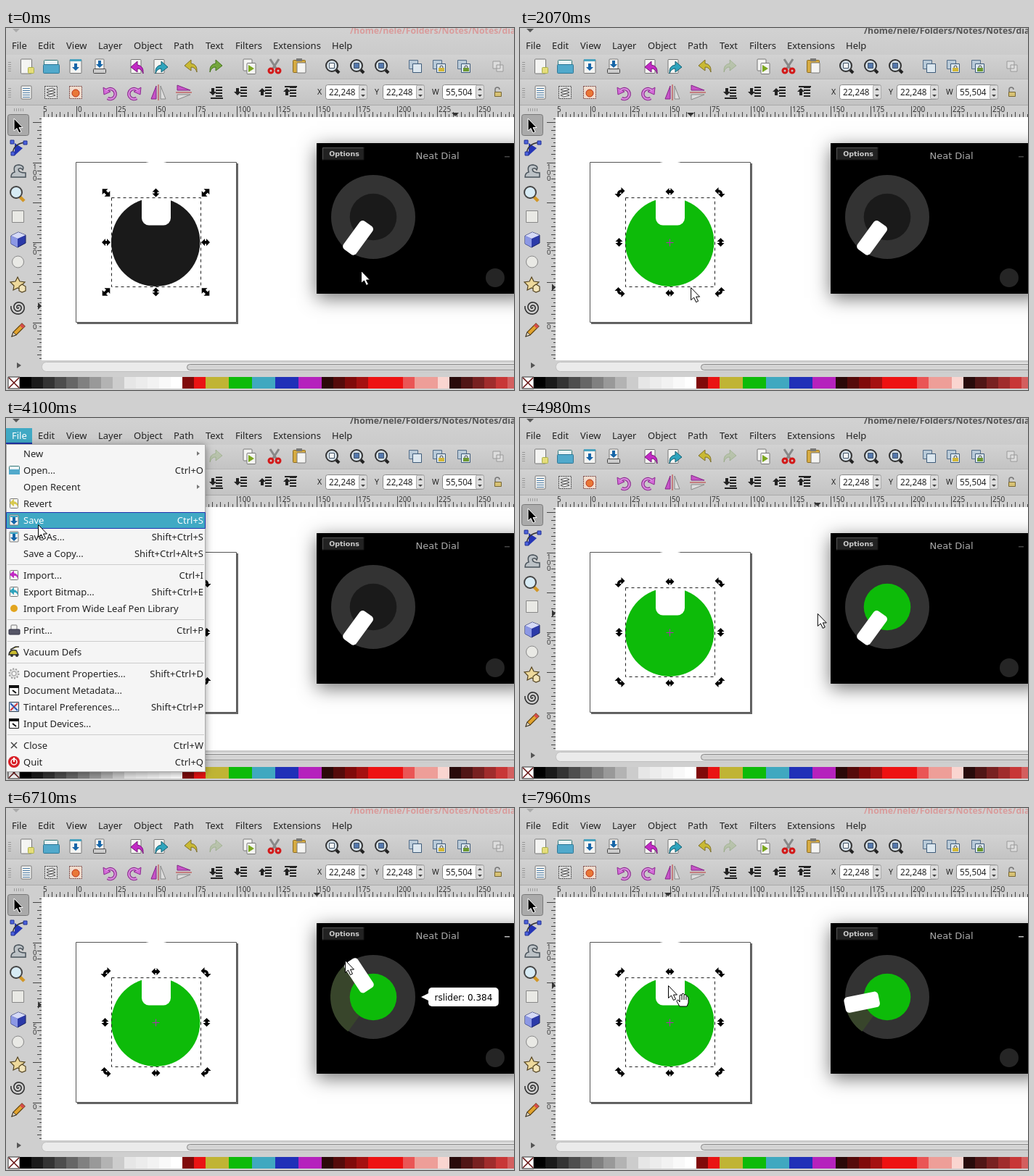
Write an HTML page with a canvas that moves like this. It is 700 by 500 pixels and loops after 8000 ms.

```html
<!DOCTYPE html>
<html lang="en">
<head>
<meta charset="utf-8">
<title>Knob editing</title>
<style>
  html, body { margin: 0; width: 100%; height: 100%; overflow: hidden; background: #cdcdcd; }
  canvas { display: block; width: 700px; height: 500px; }
</style>
</head>
<body>
<canvas id="stage" width="700" height="500"></canvas>
<script>
const ctx = document.getElementById('stage').getContext('2d');
const LOOP = 8000, UI = '"Noto Sans", sans-serif', WIDGET = '"DejaVu Sans", sans-serif';
const GREEN = '#0dbb09', BLUE = '#40a9c4', PANEL = '#cfcfcf';

// Timed moves: [ms, ...values]
const cursorKeys = [
  [0, 489, 335], [40, 489, 335], [180, 478, 312], [500, 380, 293], [800, 212, 306], [1290, 212, 306],
  [1600, 308, 476], [1740, 318, 484], [1900, 318, 484], [2300, 84, 130], [2470, 62, 98], [2550, 62, 98],
  [2960, 19, 18], [3200, 19, 18], [3560, 42, 148], [3770, 42, 148], [3810, 44, 147], [4400, 44, 147],
  [5020, 428, 272], [5210, 485, 274], [5300, 485, 274], [5940, 463, 222], [6060, 463, 222],
  [6380, 470, 110], [6710, 467, 210], [6880, 467, 210], [7180, 462, 262], [7300, 462, 262],
  [7460, 428, 262], [7960, 204, 245]
];
const valueKeys = [[5300, 0], [5940, .28], [6060, .28], [6380, .88], [6710, .384], [6880, .384], [7180, .147]];

// Smooth interpolation that rests at holds and never overshoots
function track(keys, t, c) {
  const n = keys.length - 1;
  if (t <= keys[0][0]) return keys[0][c];
  if (t >= keys[n][0]) return keys[n][c];
  const i = keys.findIndex(k => k[0] > t) - 1;
  const slope = j => (keys[j + 1][c] - keys[j][c]) / (keys[j + 1][0] - keys[j][0]);
  const tangent = j => {
    if (j < 1 || j >= n) return 0;
    const a = slope(j - 1), b = slope(j);
    return a * b <= 0 ? 0 : 2 * a * b / (a + b);
  };
  const [a, b] = [keys[i], keys[i + 1]], d = b[0] - a[0], u = (t - a[0]) / d, v = 1 - u;
  return v * v * (1 + 2 * u) * a[c] + u * u * (3 - 2 * u) * b[c]
    + d * u * v * (v * tangent(i) - u * tangent(i + 1));
}
const cursorAt = t => [track(cursorKeys, t, 1), track(cursorKeys, t, 2)];

// Drawing helpers
function paint(path, fill, stroke, width = 1) {
  if (fill) { ctx.fillStyle = fill; ctx.fill(path); }
  if (stroke) { ctx.strokeStyle = stroke; ctx.lineWidth = width; ctx.stroke(path); }
}
function shape(d, x, y, fill, stroke, width, turn = 0, flip = 1) {
  ctx.save();
  ctx.translate(x, y);
  ctx.rotate(turn * Math.PI / 180);
  ctx.scale(flip, 1);
  paint(new Path2D(d), fill, stroke, width);
  ctx.restore();
}
function box(x, y, w, h, fill, stroke, r = 0) {
  const p = new Path2D();
  p.roundRect(x, y, w, h, r);
  paint(p, fill, stroke);
}
function disc(x, y, r, fill, stroke, width) {
  const p = new Path2D();
  p.arc(x, y, r, 0, 7);
  paint(p, fill, stroke, width);
}
function text(s, x, y, size = 13, color = '#222', align = 'left', font = UI, weight = '') {
  ctx.font = `${weight} ${size}px ${font}`;
  ctx.fillStyle = color;
  ctx.textAlign = align;
  ctx.fillText(s, x, y);
}
function shade(y, h, from, to) {
  const g = ctx.createLinearGradient(0, y, 0, y + h);
  g.addColorStop(0, from);
  g.addColorStop(1, to);
  box(0, y, 700, h, g);
}
function dashed(pattern, drawDashed) {
  ctx.setLineDash(pattern);
  drawDashed();
  ctx.setLineDash([]);
}
function shadowed(color, blur, offset, drawShadowed) {
  ctx.save();
  ctx.shadowColor = color; ctx.shadowBlur = blur; ctx.shadowOffsetY = offset;
  drawShadowed();
  ctx.restore();
}

const CURVE = 'M8 8Q9 -3 0 -4V-9L-9 -1L0 6V1Q6 1 8 8Z';
const DOWN = 'M-2 -5H2V0H5L0 5L-5 0H-2Z';
const DOUBLE = 'M-6 0L-1 -5V-2H1V-5L6 0L1 5V2H-1V5Z';
const STAR = 'M0 -9L3 -3L10 -2L5 3L6 9L0 6L-6 9L-5 3L-10 -2L-3 -3Z';
const ARROW = 'M0 0V17L4 13.5L7 20L10 18.5L7 12.5H12Z';

function page(x, y, w = 16, h = 20) { box(x - w / 2 + .5, y - h / 2 + .5, w - 1, h - 1, '#f4f4f2', '#777', 1); }
function grip(x, y, dx, dy) { for (let i = -2; i < 3; i++) box(x + i * dx, y + i * dy, dx ? 1 : 4, dy ? 1 : 4, '#999'); }

function fileIcons(redoReady) {
  page(28, 53, 16, 21); box(30.5, 54.5, 8, 8, '#e6dd7a', '#a8b04a', 1);
  box(52.5, 44.5, 19, 17, '#e9f3f7', '#377', 1); box(51.5, 50.5, 22, 12, '#51a9cb', '#2d7695', 1);
  page(96, 53, 17); box(88, 43, 16, 3, '#49a3bf'); shape(DOWN, 96, 54, '#1565a8');
  page(129, 51, 13, 17); shape(DOWN, 129, 50, '#1565a8'); box(120.5, 56.5, 17, 6, '#ccc', '#444', 1);
  page(179, 53, 15); shape(CURVE, 181, 55, '#c22ac4', '#78147a');
  page(211, 53, 15); shape(CURVE, 214, 55, '#2fa4bd', '#146073', 1, 0, -1);
  shape(CURVE, 255, 53, '#c9b934', '#7e702a');
  ctx.globalAlpha = redoReady ? 1 : .22;
  shape(CURVE, 289, 53, '#74a63c', '#47741f', 1, 0, -1);
  ctx.globalAlpha = 1;
  page(333, 51, 13, 17); page(338, 56, 13, 16); shape('M-4 -5L4 0L-4 5Z', 338, 56, '#7ca81f');
  shape('M-6 -9L3 5M6 -9L-3 5', 370, 52, null, '#888', 3);
  disc(365, 59, 3, null, '#d31818', 3); disc(375, 59, 3, null, '#d31818', 3);
  box(395.5, 44.5, 17, 17, '#d6ab42', '#8a6b22', 1); box(400, 42, 8, 4, '#777'); page(407, 55, 13, 15);
  for (const x of [450, 484, 518]) {
    shape('M5 6L9 10', x, 52, null, '#222', 4);
    disc(x - 1, 52, 8, '#d5e0e8', '#333', 2);
    box(x - 4.5, 48.5, 7, 7, x > 460 ? '#5478ad' : '#f4f4f4', '#456');
  }
  for (const x of [564, 597, 631]) {
    box(x - 8.5, 44.5, 12, 12, '#b9cad8', '#536d88');
    box(x - 3.5, 49.5, 12, 12, '#dce7ef', '#3d5a79');
    if (x > 570) { disc(x + 3, 54, 2, null, '#444'); box(x - 1, 55, 8, 5, x < 610 ? '#d2b636' : '#6d9932'); }
  }
  shape('M-7 -7H3V3H-7ZM-2 -2H7V7H-2Z', 678, 53, '#ddd', '#999');
}

function editIcons() {
  page(28, 89, 15, 19); for (let y = 83; y < 97; y += 3) box(23, y, 10, 1, '#4a7aa5');
  dashed([2, 1], () => {
    box(53.5, 80.5, 17, 17, '#ddd', '#444');
    box(87.5, 80.5, 17, 17, '#f0dccd', '#744');
  });
  for (let y = 85; y < 95; y += 4) shape('M-6 0L2 -2L6 0L-2 2Z', 62, y, '#fff', '#555');
  disc(96, 90, 5, '#e97837', '#bd2f17');
  for (const [x, flip] of [[143, 1], [177, -1]]) {
    const loop = 'M-5 -3A7 7 0 1 1 -3 7';
    shape(loop, x, 90, null, '#8c2a90', 4.5, 0, flip);
    shape('M-9 -8L-8 2L1 -2Z', x, 90, '#d46ad8', '#8c2a90', 1, 0, flip);
    shape(loop, x, 90, null, '#d98add', 2.2, 0, flip);
  }
  for (const [x, turn] of [[210, 0], [245, 90]]) {
    shape('M-3 -9V9H-10Z', x, 89, '#c653c8', '#852488', 1, turn);
    shape('M3 -9V9H10Z', x, 89, '#ddd', '#888', 1, turn);
    shape('M0 -11V11', x, 89, null, '#b33', 1, turn);
  }
  [290, 324, 358, 392].forEach((x, i) => {
    for (let k = 0; k < 4; k++) box(x - 1, 81 + k * 4, 9, 2, '#222');
    shape(DOWN, x - 5, 88, '#222', null, 1, i > 1 ? 180 : 0);
    if (i % 3 === 0) box(x - 8, i ? 80 : 96, 17, 2, '#222');
  });
  for (const [label, left, value] of [['X', 441, '22,248'], ['Y', 520, '22,248'], ['W', 602, '55,504']]) {
    text(label, left - (label === 'W' ? 15 : 12), 92, 10.5);
    box(left - .5, 78.5, 57, 20, '#fff', '#888', 3);
    box(left + 45.5, 79, 11, 19, '#ddd', '#aaa', 2);
    text(value, left + 4, 93, 11.7);
    shape('M-3 -3L0 -6L3 -3ZM-3 3L0 6L3 3Z', left + 51, 89, '#444');
  }
  shape('M-3 0V-3A3 3 0 0 1 3 -3', 677, 88, null, '#777', 1.5);
  box(673.5, 88.5, 9, 6, '#d7c174', '#776734');
}

function toolIcons() {
  box(2.5, 119.5, 29, 29, '#aaa', '#777', 3);
  shape(ARROW, 11, 125, '#000', '#fff');
  shape('M-5 -7V10L6 0Z', 17, 166, '#2536b7');
  shape('M-9 8Q-8 -6 8 -8', 18, 166, null, '#333', 1.5);
  for (const [x, y] of [[8, 157], [26, 158], [9, 173]]) box(x - 2, y - 2, 5, 5, '#4d63dd', '#203094');
  shape('M-10 9Q-10 3 -5 2Q-8 -8 1 -8Q9 -7 6 -1Q3 -5 0 -2Q0 3 10 3V9Z', 17, 197, '#bcc2c6', '#4a545c', 1.5);
  shape('M5 5L11 11', 14, 228, null, '#d29725', 4.5);
  disc(14, 227, 8, '#d7ebf4', '#444', 2);
  box(8.5, 252.5, 16, 16, '#e9e9e5', '#888');
  shape('M-10 -5L0 -10L10 -6V5L-1 11L-10 6Z', 17, 292, '#2c3aa8', '#182264');
  shape('M-10 -5L0 -10L10 -6L-1 -1Z', 17, 292, '#d5d9f6'); shape('M-10 -5L-1 -1V11L-10 6Z', 17, 292, '#8c98e4');
  disc(16.5, 323, 8, '#e9e9e5', '#888');
  shape(STAR, 16, 353, '#eed99c', '#544420', 1.2);
  shape('M0 -5L5 -2V4L0 6L-4 4V-2Z', 22, 359, '#f2e4b8', '#544420', 1.2);
  let spiral = 'M0 0';
  for (let a = .3; a < 16; a += .3) spiral += `L${a * .65 * Math.cos(a)} ${a * .65 * Math.sin(a)}`;
  shape(spiral, 17, 386, null, '#333', 1.6);
  shape('M-9 9L-7 3L5 -9L9 -5L-3 7Z', 17, 417, '#e2a32e', '#5f420f', 1.2);
  shape('M-9 9L-7 3L-3 7Z', 17, 417, '#e8d7b8', '#333'); shape('M5 -9L9 -5L6 -2L2 -6Z', 17, 417, '#d54d4d');
  shape('M-2 -4L4 0L-2 4Z', 17, 466, '#555');
}

function rulers([mx, my]) {
  box(49, 107, 651, 16, PANEL);
  box(36, 123, 13, 336, PANEL);
  const step = 5.525, length = (i, size) => Math.round(size / (i % 10 === 0 ? 1 : i % 2 ? 3 : 2)) - 1;
  for (let i = -8; i < 110; i++) {
    const x = Math.round(96.5 + i * step), h = length(i, 16);
    if (x >= 49) box(x, 123 - h, 1, h, '#444');
    if (i % 10 === 0) text(i * 2.5, x + 2, 116, 10, '#333');
  }
  text('5', 51, 116, 10, '#333');
  for (let i = -9; i < 52; i++) {
    const y = Math.round(406.5 - i * step), w = length(i, 13);
    if (y > 123) box(49 - w, y, w, 1, '#444');
  }
  [['100', 195], ['50', 305], ['0', 416]].forEach(([s, y]) => [...s].forEach((c, i) => text(c, 37, y + i * 8, 9.5, '#333')));
  shape('M-5 0H5L0 5Z', mx, 117, '#333');
  shape('M0 -5V5L5 0Z', 44, my, '#333');
}

function scrollbar() {
  box(0, 459, 700, 18, PANEL);
  shape('M-2 -4L4 0L-2 4Z', 17, 466, '#555');
  box(49.5, 461.5, 660, 13, '#ebebeb', '#c0c0c0', 6);
  box(249.5, 464.5, 470, 8, '#d4d4d4', '#888', 4);
}

function palette() {
  const runs = ['#000', '#1a1a1a', '#333', '#4d4d4d', '#666', '#808080', '#999', '#b3b3b3', '#ccc', '#e6e6e6',
    '#ececec', '#f2f2f2', '#f9f9f9', '#fff', '#800a0a', '#ea1313', '#c0b434*2', GREEN + '*2', '#40a8c0*2',
    '#2030b8*2', '#b522bd*2', '#2b0808', '#550a0a', '#800a0a', '#a51010', '#ee1111*3', '#ea5555', '#ee9e98*2',
    '#fad5d0', '#280b0b', '#501616', '#782121', '#a02c2c', '#c83737', '#d35f5f'];
  box(0, 477, 700, 23, PANEL);
  box(3, 482, 16, 16, '#fff', '#333'); shape('M-7 -7L7 7M7 -7L-7 7', 11, 490, null, '#611', 1.5);
  let x = 19;
  for (const run of runs) {
    const [color, n = 1] = run.split('*');
    box(x, 482, 16 * n, 16, color);
    x += 16 * n;
  }
}

function drawing(green, rotating) {
  box(49, 123, 651, 336, '#fff');
  box(98, 187, 222, 222, '#666'); box(96.5, 185.5, 221, 221, '#fff', '#555');
  disc(206.2, 295.8, 61.2, green ? GREEN : '#1a1a1a');
  box(187, 185, 40, 87.5, '#fff', null, 10);
  dashed([4, 4], () => box(145.5, 234.5, 123, 123, null, '#222'));
  for (let k = 0; k < 4; k++) {
    ctx.save();
    ctx.translate(206.5, 296);
    ctx.rotate(k * Math.PI / 2);
    if (rotating) {
      shape(DOUBLE, 0, -70, '#000');
      shape('M-3 2Q-3 -3 2 -3', -68, -68, null, '#000', 3.5);
      shape('M1 -8L6 -3L1 2ZM-8 1L-3 6L2 1Z', -68, -68, '#000');
    } else {
      shape(DOUBLE, 0, -68.5, '#000', null, 1, 90);
      shape('M-7.5 0L-2 -5.5V-2H2V-5.5L7.5 0L2 5.5V2H-2V5.5Z', -68.5, -68.5, '#000', null, 1, 45);
    }
    ctx.restore();
  }
  if (rotating) shape('M-5 0H5M0 -5V5', 206.5, 296.5, null, '#b02ab5');
}

function knobPanel(value, green, active, bubble) {
  shadowed('rgba(0,0,0,.55)', 24, 6, () => box(428, 159, 290, 208, '#000'));
  box(436, 165, 57, 17, '#222'); shape('M0 17V0H57', 436.5, 165.5, null, '#555'); shape('M0 17H57V0', 436, 165, null, '#151515');
  text('Options', 466, 177, 9.5, '#ccc', 'center', WIDGET, 'bold');
  text('Neat Dial', 594.5, 181, 13, '#aaa', 'center', WIDGET);
  box(687, 177, 7, 1.5, active ? '#bbb' : '#444');
  disc(674, 345, 13, '#252525');

  const start = -.8 * Math.PI, angle = start + value * 1.6 * Math.PI, top = -Math.PI / 2;
  disc(506, 261, 58, '#333');
  if (value > 0) {
    const arc = new Path2D();
    arc.arc(506, 261, 59, start + top, angle + top);
    arc.arc(506, 261, 32, angle + top, start + top, true);
    paint(arc, '#38452b');
  }
  disc(506, 261, 32.3, green ? GREEN : '#1a1a1a');
  ctx.save();
  ctx.translate(506, 261);
  ctx.rotate(angle);
  box(-10.9, -59.6, 21.8, 48, '#fff', null, 5);
  ctx.restore();

  if (bubble) {
    const label = 'rslider: ' + +value.toFixed(3);
    ctx.font = '12px ' + WIDGET;
    box(582, 248, ctx.measureText(label).width + 17, 26, '#fff', null, 5);
    shape('M0 0L10 -5V5Z', 572, 261, '#fff');
    text(label, 590.5, 266, 12, '#000', 'left', WIDGET);
  }
}

const menuItems = [
  ['New', '>'], ['Open...', 'Ctrl+O', 'folder'], ['Open Recent', '>'], ['Revert', '', '#d8c94e'],
  ['Save', 'Ctrl+S', 'down'], ['Save As...', 'Shift+Ctrl+S', 'down'], ['Save a Copy...', 'Shift+Ctrl+Alt+S'], 0,
  ['Import...', 'Ctrl+I', '#c22ac4'], ['Export Bitmap...', 'Shift+Ctrl+E', '#2fa4bd'],
  ['Import From Wide Leaf Pen Library', '', 'dot'], 0, ['Print...', 'Ctrl+P', 'print'], 0,
  ['Vacuum Defs', '', 'vacuum'], 0, ['Document Properties...', 'Shift+Ctrl+D', 'gear'],
  ['Document Metadata...', '', 'window'], ['Tintarel Preferences...', 'Shift+Ctrl+P', 'tools'],
  ['Input Devices...', '', 'window'], 0, ['Close', 'Ctrl+W', 'close'], ['Quit', 'Ctrl+Q', 'quit']
];
const menuIcons = {
  folder(x, y) { box(4.5, y - 5.5, 14, 10, '#e9f3f7', '#377', 1); box(4, y - 1, 15, 7, '#51a9cb'); },
  down(x, y) { page(x, y, 13, 15); box(6, y - 6, 10, 2, BLUE); shape(DOWN, x, y + 1, '#1565a8'); },
  dot(x, y) { disc(x, y, 5, '#e2a51f'); },
  print(x, y) { page(x, y - 3, 9, 9); box(4, y - 1, 15, 7, '#556', '#334', 1); },
  vacuum(x, y) {
    shape('M-7 4Q-6 -4 3 -2L6 4ZM-5 -3L2 -7H7', x, y, '#c9bb2e', '#333', 1.5);
    disc(8, y + 5, 2, '#333'); disc(15, y + 5, 2, '#333');
  },
  gear(x, y) { dashed([2, 2], () => disc(x, y, 6.5, '#ddd', '#999', 2)); disc(x, y, 3, '#f5f5f5', '#999'); },
  window(x, y) { box(4.5, y - 6.5, 13, 13, '#fff', '#111'); box(4, y - 7, 14, 4, '#111'); shape('M0 0L5 4', x - 2, y, null, '#111', 2); },
  tools(x, y) {
    box(4.5, y - 6.5, 13, 13, '#dde7f3', '#345');
    shape('M-5 5L5 -5', x, y, null, '#d43a3a', 2); shape('M-5 -5L5 5', x, y, null, '#2b58b5', 2);
  },
  close(x, y) { shape('M-4 -4L4 4M4 -4L-4 4', x, y, null, '#444', 1.5); },
  quit(x, y) { disc(x, y, 8, '#d81f26'); disc(x, y, 4, null, '#fff', 1.5); shape('M0 -6V0', x, y, null, '#fff', 2); }
};
function menuIcon(kind, x, y) {
  if (menuIcons[kind]) return menuIcons[kind](x, y);
  page(x, y, 12, 14);
  shape(CURVE.replace(/-?\d+/g, n => n * .7), x, y, kind);
}
function fileMenu(alpha, cy) {
  box(0, 14, 36, 22, BLUE); box(0, 34, 36, 2, '#2034b0');
  text('File', 8, 29, 13, '#fff');
  ctx.globalAlpha = alpha;
  shadowed('rgba(0,0,0,.4)', 10, 2, () => box(0, 36, 275, 453, '#f5f5f5'));
  box(.5, 36.5, 274, 452, null, '#aaa');
  let y = 38;
  for (const item of menuItems) {
    if (!item) { box(2, y + 3, 271, 1, '#ccc'); y += 7; continue; }
    const [label, key, icon] = item, mid = y + 11, hot = cy >= y && cy < y + 23;
    const color = hot ? '#fff' : '#222';
    if (hot) box(.5, y + .5, 274, 22, BLUE, '#2034b0');
    if (icon) menuIcon(icon, 11, mid);
    text(label, 24, mid + 5, 13, color);
    if (key === '>') shape('M-2 -3L2 0L-2 3Z', 265, mid, '#777');
    else text(key, 272, mid + 5, 13, color, 'right');
    y += 23;
  }
  ctx.globalAlpha = 1;
}

function pointer(x, y, hand) {
  shape(ARROW, x + .5, y + .5, '#fff', '#000');
  if (hand) shape('M-4 9L-8 2Q-8 -1 -5 1L-4 3V-6Q-3 -8 -1 -6V-8Q1 -10 3 -7Q5 -8 6 -5Q8 -5 8 -2V4L6 9ZM-1 -6V0M2 -7V0M5 -5V0', x + 20, y + 20, '#fff', '#000');
}

// Ruler marks stay where the cursor last left the drawing area
const onCanvas = ([x, y]) => x >= 49 && x <= 428.5 && y >= 129 && y < 459;
function rulerMarks(t) {
  for (let s = t; s >= 0; s -= 5) {
    const p = cursorAt(s);
    if (onCanvas(p)) return p;
  }
  return [619, 384];
}

function toolbars(focused, redoReady) {
  shade(0, 37, '#d2d2d2', '#cbcbcb');
  shade(37, 34, '#d2d2d2', '#c3c3c3');
  shade(71, 36, '#d2d2d2', '#c3c3c3');
  box(0, 70, 700, 1, '#b5b5b5'); box(0, 106, 700, 1, '#aaa');
  shape('M-5 -2H5L0 3Z', 14, 3, focused ? '#555' : '#aaa');
  text('/home/nele/Folders/Notes/Notes/dials', 474, 8, 12.3, focused ? '#555' : '#d99c9c', 'left', UI, 'bold');
  [['File', 8], ['Edit', 44], ['View', 83], ['Layer', 127], ['Object', 176], ['Path', 231], ['Text', 275],
    ['Filters', 316], ['Extensions', 368], ['Help', 449]].forEach(([s, x]) => text(s, x, 29));
  grip(3, 53, 0, 3); grip(3, 89, 0, 3); grip(17, 111, 3, 0);
  fileIcons(redoReady);
  editIcons();
}

function draw(t) {
  const focused = t >= 1070 && t < 5290, green = t >= 1780;
  const bubble = (t >= 200 && t < 870) || (t >= 5300 && t < 7900);
  const cursor = cursorAt(t), [cx, cy] = cursor;
  box(0, 0, 700, 500, PANEL);
  toolbars(focused, !green);
  toolIcons();
  drawing(green, t >= 1110);
  rulers(rulerMarks(t));
  scrollbar();
  palette();
  knobPanel(track(valueKeys, t, 1), t >= 4480, t >= 5290, bubble);
  if (t >= 3140 && t < 4200) fileMenu(Math.min(1, (t - 3100) / 140), cy);
  pointer(cx, cy, onCanvas(cursor) && Math.hypot(cx - 206.5, cy - 296) < 61);
}

function frame(now) {
  draw(now % LOOP);
  requestAnimationFrame(frame);
}
requestAnimationFrame(frame);
</script>
</body>
</html>
```
